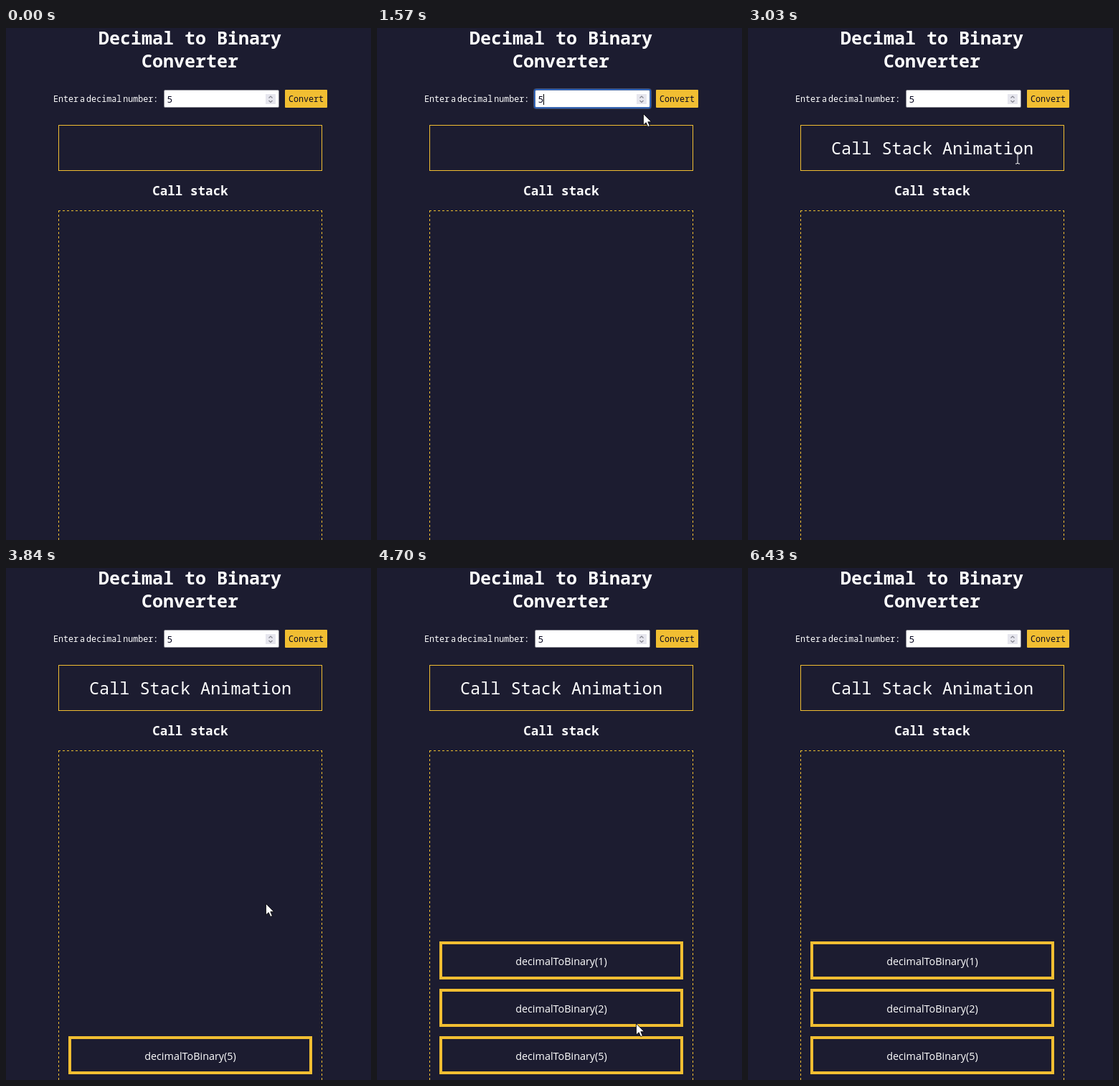
Recreate the animation shown at these times as an HTML page. Size 509 by 713 pixels, loop 8.69 s.

```html
<!DOCTYPE html>
<html lang="en">
<head>
<meta charset="utf-8">
<title>Decimal to Binary Converter</title>
<style>
  html, body { margin: 0; width: 100%; height: 100%; overflow: hidden; background: #1c1c30; }
  svg { display: block; }
  text { fill: #fff; font-family: "Noto Sans Mono", "DejaVu Sans Mono", monospace; white-space: pre; }
  .mid { text-anchor: middle; }
  .title { font-size: 25px; font-weight: 700; }
  .label { font-size: 11.7px; word-spacing: -5px; }
  .dark { fill: #0a0a23; }
  .call { font: 14.4px "Open Sans", "Noto Sans", sans-serif; }
  .gold { fill: none; stroke: #f1be32; }
</style>
</head>
<body>
<svg width="509" height="713" viewBox="0 0 509 713">
  <rect width="509" height="713" fill="#1c1c30"/>
  <text class="title mid" x="256.5" y="23">Decimal to Binary</text>
  <text class="title mid" x="256.5" y="55">Converter</text>
  <text class="label" x="66" y="103">Enter a decimal number:</text>

  <rect x="220.5" y="86.5" width="160" height="24" rx="1.5" fill="#fff" stroke="#85858f"/>
  <g id="focus" fill="none">
    <rect x="218.5" y="84.5" width="164" height="28" rx="3" stroke="#464c66"/>
    <rect x="219.75" y="85.75" width="161.5" height="25.5" rx="2" stroke="#1f5fc4" stroke-width="1.5"/>
  </g>
  <text class="dark" x="224.5" y="104" font-size="13">5</text>
  <rect id="caret" x="232" y="92" width="1" height="15" fill="#000"/>
  <rect x="362" y="92" width="14" height="14" fill="#e6e6ee"/>
  <path d="M366.5 97.5L369 95L371.5 97.5M366.5 101L369 103.5L371.5 101" fill="none" stroke="#85858f" stroke-width="1.2"/>

  <rect x="389" y="86" width="59" height="25" rx="1" fill="#f1be32"/>
  <text class="dark mid" x="418.5" y="103" font-size="11.7">Convert</text>

  <rect class="gold" x="73.5" y="135.5" width="367" height="63"/>
  <text id="message" class="mid" x="257" y="176" font-size="23.5">Call Stack Animation</text>
  <text class="mid" x="257" y="233" font-size="17.6" font-weight="700">Call stack</text>
  <path class="gold" d="M73 254.5H441M73.5 254V713M440.5 254V713" stroke-dasharray="3 3"/>
  <g id="stack"></g>

  <g id="cursor" fill="#fff" stroke="#000" stroke-linejoin="round">
    <path id="arrow" d="M.5 .5V16L4.2 12.7L6.8 18.6L9.4 17.4L6.8 11.7H11.6Z" stroke-width=".8"/>
    <path id="beam" d="M-3 -8H-1L0 -7L1 -8H3M0 -7V7M-3 8H-1L0 7L1 8H3" fill="none" stroke="#fff"/>
    <path id="hand" stroke-width=".8" d="M-2 2Q-2 .5 -.5 .5T1.3 2V7Q2.5 6 4 7.4Q5.5 6.7 6.8 8.4Q9.8 8 9.8 11V16Q9.8 19 7.8 20V22.5H-1V20Q-3 17.5 -5.6 13.5Q-6 11.5 -4.5 11.3Q-3.2 11.4 -2 13Z"/>
  </g>
</svg>
<script>
const LOOP = 8690, TICK = 1000 / 15;
const $ = id => document.getElementById(id);
const show = (el, on) => el.setAttribute("visibility", on ? "visible" : "hidden");
const easeOut = p => 1 - (1 - p) ** 2;

// Event times in ticks of a 15 fps clock.
const ENTER = 5, FOCUS = 17, BLINK = 8, BLUR = 34, MESSAGE = 36, LEAVE = 96;
const calls = [0, 1, 2].map(i => ({ n: 5 >> i, at: Math.round(51 + 7.5 * i) }));

// The pointer glides to each stop between two ticks, then rests there.
const ENTRY = { x: 459, y: 683 };
const STOPS = [
  { from: 5, to: 10, x: 201, y: 75 },    // beside the field
  { from: 12, to: 18, x: 240, y: 99 },   // inside the field
  { from: 20, to: 30, x: 497, y: 139 },  // past the button
  { from: 30, to: 33, x: 439, y: 110 },  // on the button
  { from: 37, to: 46, x: 375, y: 182 },  // over the message
  { from: 53, to: 57, x: 362, y: 467 },  // down the stack
  { from: 57, to: 67, x: 350, y: 685 },
  { from: 67, to: 73, x: 365, y: 617 },
  { from: 77, to: 81, x: 365, y: 549 },
  { from: 92, to: 95, x: 390, y: 643 }
];

$("stack").innerHTML = calls.map(({ n }, i) => `<g transform="translate(0 ${-66 * i})">
  <rect class="gold" x="89" y="654" width="336" height="49" stroke-width="4"/>
  <text class="call mid" x="257" y="685">decimalToBinary(${n})</text></g>`).join("");
const callBoxes = [...$("stack").children];

function pointerAt(tick) {
  let { x, y } = ENTRY;
  for (const stop of STOPS) {
    if (tick < stop.from) break;
    const p = easeOut(Math.min(1, (tick - stop.from) / (stop.to - stop.from)));
    x += (stop.x - x) * p;
    y += (stop.y - y) * p;
  }
  return [Math.round(x), Math.round(y)];
}

function pointerKind(x, y, tick) {
  const inside = (l, t, r, b) => x >= l && x <= r && y >= t && y <= b;
  if (inside(389, 86, 448, 111)) return "hand";
  const overText = inside(220, 86, 381, 111) || inside(66, 91, 212, 107) ||
    (tick >= MESSAGE && inside(116, 150, 398, 184));
  return overText ? "beam" : "arrow";
}

function render(ms) {
  const tick = Math.floor((ms + 7) / TICK - 0.5);
  const focused = tick >= FOCUS && tick < BLUR;
  show($("focus"), focused);
  show($("caret"), focused && Math.floor((tick - FOCUS) / BLINK) % 2 === 0);
  show($("message"), tick >= MESSAGE);
  callBoxes.forEach((box, i) => show(box, tick >= calls[i].at));

  const [x, y] = pointerAt(tick);
  const kind = tick >= ENTER && tick < LEAVE && pointerKind(x, y, tick);
  for (const id of ["arrow", "beam", "hand"]) show($(id), id === kind);
  $("cursor").setAttribute("transform", `translate(${x} ${y})`);
}

const start = performance.now();
function loop() {
  render((performance.now() - start) % LOOP);
  requestAnimationFrame(loop);
}
loop();
</script>
</body>
</html>
```
